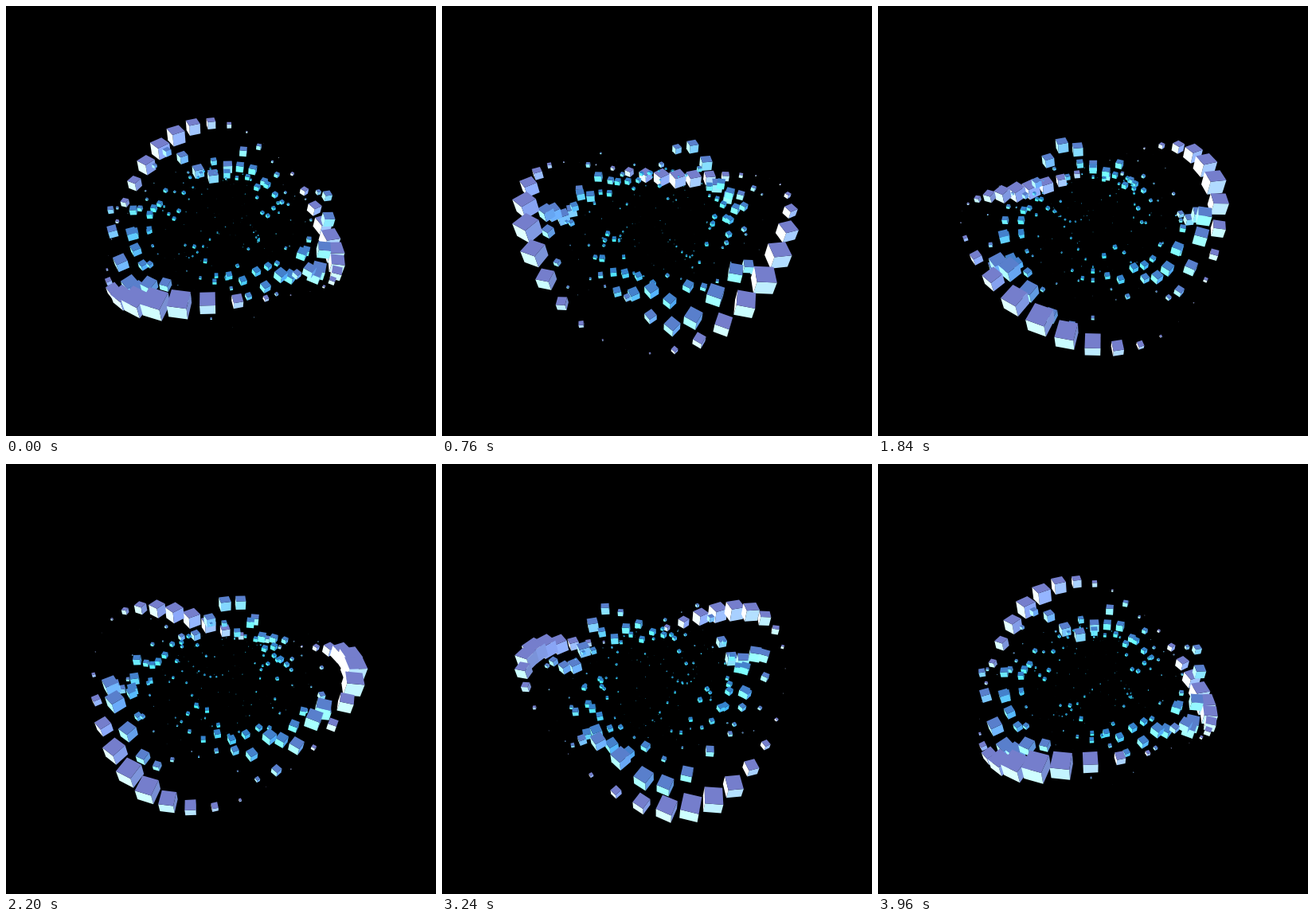
Recreate the animation shown at these times as an HTML page with a canvas. Size 540 by 540 pixels, loop 4000 ms.

```html
<!DOCTYPE html>
<html lang="en">
<head>
<meta charset="utf-8">
<title>Cube rings</title>
<style>
  html, body { margin: 0; width: 100%; height: 100%; overflow: hidden; background: #000; }
  canvas { display: block; width: 540px; height: 540px; }
</style>
</head>
<body>
<canvas id="stage" width="540" height="540"></canvas>
<script>
const ctx = document.getElementById('stage').getContext('2d');
const LOOP = 4000, STEP = 40;
const CENTER = 270, DIST = 467.65, TILT = Math.SQRT1_2;
const RINGS = 7, PER_RING = 36;
const rad = deg => deg * Math.PI / 180;
const sin = deg => Math.sin(rad(deg));
const cos = deg => Math.cos(rad(deg));

// x to the right, h up, f towards the viewer; the camera looks down at 45 degrees
function project([x, h, f]) {
  const s = DIST / (DIST - TILT * (f + h));
  return [CENTER + x * s, CENTER - TILT * (h - f) * s];
}

function color(rgb) {
  return 'rgb(' + rgb.map(v => Math.min(255, Math.round(v))).join(',') + ')';
}

// Sides are lit from the left with a slightly cyan light
function sideColor([r, g, b], nx) {
  return color([r * (1.6 - 0.6 * nx), g * (1.85 - 0.75 * nx), b * (1.7 - 0.7 * nx)]);
}

function face(points, fill) {
  ctx.beginPath();
  for (const p of points) ctx.lineTo(...project(p));
  ctx.closePath();
  ctx.fillStyle = fill;
  ctx.fill();
}

function drawCube({ x, h, f, size, yaw, base }) {
  const half = size / 2, eye = DIST * TILT;
  const corner = (k, up) => {
    const a = yaw + 45 + 90 * k, r = half * Math.SQRT2;
    return [x + r * sin(a), h + up * half, f - r * cos(a)];
  };
  for (let k = 0; k < 4; k++) {
    const nx = sin(yaw + 90 * k), nf = -cos(yaw + 90 * k);
    const facing = -nx * x + nf * (eye - f) - half;
    if (facing <= 0) continue;
    face([corner(k - 1, 1), corner(k, 1), corner(k, -1), corner(k - 1, -1)],
      sideColor(base, nx));
  }
  face([0, 1, 2, 3].map(k => corner(k, 1)), color(base));
}

function cubesAt(turn) {
  const cubes = [];
  for (let ring = 0; ring < RINGS; ring++) {
    const radius = 150 - 20 * ring, lift = 50 - 19 * ring;
    const scale = (radius / 150) ** 2;
    const base = [30 + 87 * scale * (0.6 + 0.4 * scale), 132 - 6 * scale, 204];
    for (let i = 0; i < PER_RING; i++) {
      const home = 4.5 + 10 * i, angle = home + turn;
      cubes.push({
        x: radius * sin(angle),
        f: -radius * cos(angle),
        h: lift * cos(turn - 20 - 95 * ring + 10 * i * (8 * ring - 2)),
        size: scale * (10 + 9.8 * cos(3 * home + turn + 98 - 72 * ring)),
        yaw: angle - turn / 2 - 6,
        base
      });
    }
  }
  return cubes.sort((a, b) => a.f + a.h - b.f - b.h);
}

function render(ms) {
  const time = Math.floor((ms % LOOP) / STEP) * STEP;
  ctx.fillStyle = '#000';
  ctx.fillRect(0, 0, 540, 540);
  cubesAt(360 * time / LOOP).forEach(drawCube);
}

function loop() {
  render(performance.now());
  requestAnimationFrame(loop);
}
loop();
</script>
</body>
</html>
```
